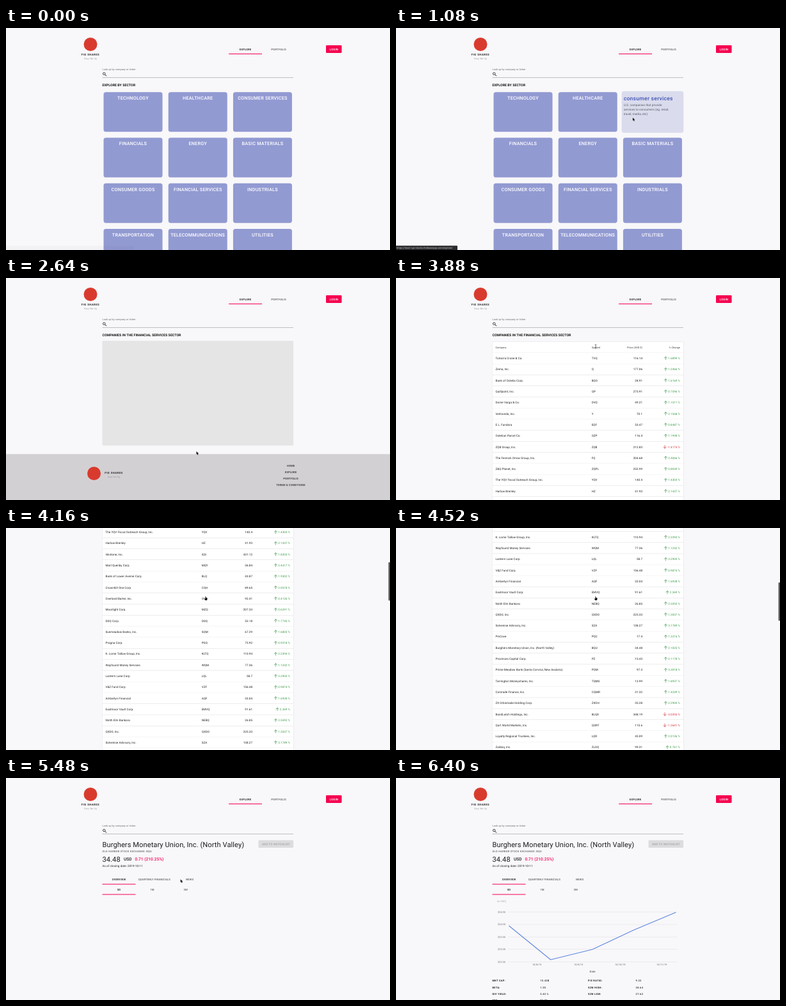
Recreate the animation shown at these times as an HTML page with a canvas. Size 600 by 347 pixels, loop 6440 ms.

```html
<!DOCTYPE html>
<html lang="en">
<head>
<meta charset="utf-8">
<title>Stock explorer</title>
<style>
html, body { margin: 0; width: 600px; height: 347px; overflow: hidden; background: #f8f7f9; }
canvas { display: block; width: 600px; height: 347px; }
</style>
</head>
<body>
<canvas id="stage"></canvas>
<script>
const W = 600, H = 347, LOOP = 6440;
const canvas = document.getElementById('stage');
const dpr = window.devicePixelRatio || 1;
canvas.width = W * dpr;
canvas.height = H * dpr;
const g = canvas.getContext('2d');

const PINK = '#f50050', INK = '#1c1c1e', GREY = '#6b6a6d', RED = '#d93a2e';
const LOAD = 2400, TABLE = 3480, DETAIL = 5360, CHART = 5640;
const ROW = 17.3, FIRST_ROW = 125.5;

const sectors = ['TECHNOLOGY', 'HEALTHCARE', 'CONSUMER SERVICES', 'FINANCIALS', 'ENERGY',
  'BASIC MATERIALS', 'CONSUMER GOODS', 'FINANCIAL SERVICES', 'INDUSTRIALS',
  'TRANSPORTATION', 'TELECOMMUNICATIONS', 'UTILITIES'];

// card index, time in, time out, description
const hovers = [
  [2, 840, 1130, 'U.S. companies that provide|services to consumers (eg. retail,|travel, media, etc)'],
  [1, 1140, 1390, 'U.S. companies involved with|health care (eg. medicines,|hospitals, devices, etc)'],
  [4, 1400, 1650, 'U.S. companies involved with the|production of energy (eg. oil, gas,|coal & renewables, etc)'],
  [5, 1660, 1950, 'U.S. companies involved with the|production of raw materials (eg. metals,|chemicals & forestry products, etc)'],
  [7, 2000, LOAD, 'U.S. companies that provide|financial services (eg. banks, credit|cards, exchanges, etc)']
];

const stocks = `Tolvarra Crane & Co.|TVQ|116.14|1.6899
Zemo, Inc.|Q|177.06|1.2466
Bank of Ostelia Corp.|BQO|28.91|1.6169
Quillpoint, Inc.|QP|275.91|0.7596
Dorne Varga & Co.|DVQ|49.21|1.1511
Velmondo, Inc.|Y|70.1|2.1568
E.L. Fundora|EQF|53.47|0.8487
Ostelian Parcel Co.|OZP|116.4|1.1998
ZQB Group, Inc.|ZQB|212.83|-1.4174
The Fennick Orrow Group, Inc.|FQ|204.68|2.4066
Z&Q Planet, Inc.|ZQPL|252.99|0.8049
The YQV Fiscal Outreach Group, Inc.|YQV|140.4|1.4304
Harlow Brenley|HZ|41.93|2.1437
Inkstone, Inc.|IQS|431.12|1.8203
Marl Quenby Corp.|MQY|36.84|2.4417
Bank of Lower Averne Corp.|BLQ|43.87|1.9302
Crownhill One Corp.|CQH|89.65|2.0518
Overland Barter, Inc.|OVQ|92.41|0.4126
Moorlight Corp.|MZQ|207.33|0.6291
DDQ Corp.|DDQ|52.18|1.7745
Sunmeadow Banks, Inc.|SQM|67.29|1.6803
Progna Corp.|PGQ|75.92|0.9318
K. Lorne Tallow Group, Inc.|KLTQ|110.94|2.2394
Wayfound Money Services|WQM|77.36|1.1242
Lantern Lane Corp.|LQL|58.7|3.2905
V&Z Fund Corp.|VZF|156.48|0.9874
Amberlyn Financial|AQF|33.04|1.6928
Eastmoor Vault Corp.|EMVQ|91.61|2.369
Ninth Elm Bankora|NEBQ|26.85|2.5592
QXDO, Inc.|QXDO|225.33|1.2037
Solvenise Advisory, Inc.|SZA|138.27|3.1789
PinCove|PQC|17.4|1.2216
Burghers Monetary Union, Inc. (North Valley)|BQU|34.48|2.1025
Provinces Capital Corp.|PZ|15.43|2.1178
Prime Meadow Bank (Santa Corvina, New Avaloria)|PQM|97.3|3.3018
Tarrington Moneyshares, Inc.|TQMS|13.99|1.8937
Comrade Finance, Inc.|CQMR|31.32|1.4249
ZX Orbistrade Holding Corp.|ZXOH|35.28|2.2905
BondLatch Holdings, Inc.|BLQX|348.19|-3.0355
Qort World Markets, Inc.|QORT|115.6|-1.2641
Loyalty Regional Trustees, Inc.|LQR|45.09|2.0136
Zaldoq, Inc.|ZLDQ|99.31|0.761
QBD Finance Group|QBDG|202.16|3.0509
Vantrow Financial Corp.|VQFC|39.43|2.2327`.split('\n').map(line => line.split('|'));

// time, x, y of the pointer
const path = [[560, 592, 250], [900, 425, 140], [1250, 320, 140], [1500, 300, 196],
  [1800, 393, 200.5], [2150, 297.5, 271], [2700, 297.5, 271], [3700, 312, 107],
  [4900, 312, 107], [5080, 278.5, 128.5], [5220, 272, 156], [5450, 272, 156], [5950, 330, 362]];

const clamp = v => Math.max(0, Math.min(1, v));
const mix = (a, b, k) => a + (b - a) * k;

function pointerAt(t) {
  if (t < path[0][0]) return null;
  const i = path.findIndex(p => p[0] > t);
  if (i < 0) return null;
  const [t0, x0, y0] = path[i - 1], [t1, x1, y1] = path[i];
  const u = (t - t0) / (t1 - t0), k = u * u * (3 - 2 * u);
  return [mix(x0, x1, k), mix(y0, y1, k)];
}

const scrollAt = t => 521.5 * (1 - (1 - clamp((t - 3900) / 1008)) ** 3);

// y is the middle of the capitals, spacing is in em
function text(s, x, y, size, color = INK, weight = 400, spacing = 0, align = 'left') {
  g.font = `${weight} ${size}px Roboto, sans-serif`;
  g.letterSpacing = spacing * size + 'px';
  g.textAlign = align;
  g.fillStyle = color;
  g.fillText(s, x, y + size * 0.355);
}

function box(x, y, w, h, color, r = 0) {
  g.fillStyle = color;
  g.beginPath();
  g.roundRect(x, y, w, h, r);
  g.fill();
}

function line(points, color, width) {
  g.strokeStyle = color;
  g.lineWidth = width;
  g.beginPath();
  points.forEach(([x, y]) => g.lineTo(x, y));
  g.stroke();
}

function dot(x, y, r, color) {
  g.fillStyle = color;
  g.beginPath();
  g.arc(x, y, r, 0, 7);
  g.fill();
}

const tab = (s, x, y, color = INK) => text(s, x, y, 4.24, color, 500, 0.0286, 'center');
const underline = (x, y) => box(x, y, 52, 0.9, PINK);
const heading = s => text(s, 150.5, 89.3, 5.22, '#111', 700, 0.0094);

function brand(x, y) {
  text('FIG SHARES', x, y, 4.3, '#2b2b2d', 700, 0.1, 'center');
  text('Easy like fig', x, y + 6.4, 3.3, '#8d8c90', 400, 0.05, 'center');
}

function header(shift) {
  dot(132, 25.5, 10.5, RED);
  brand(132, 41.2);
  tab('EXPLORE', 374, 33);
  tab('PORTFOLIO', 426, 33, '#5d5c60');
  underline(348, 40);
  box(500, 27, 24.5, 12, PINK, 1.3);
  text('LOGIN', 512.3, 33, 4.56, '#fff', 500, 0.0286, 'center');
  g.save();
  g.translate(0, shift);
  text('Look up by company or ticker', 150.5, 64.2, 3.91, GREY, 400, 0.009);
  g.strokeStyle = '#111';
  g.lineWidth = 0.8;
  g.beginPath();
  g.arc(153.3, 71.4, 1.8, 0, 7);
  g.stroke();
  line([[154.6, 72.7], [157, 75.1]], '#111', 1);
  box(150.5, 76.9, 298.5, 0.6, '#87868a');
  g.restore();
}

function card(i, t) {
  const cx = 198.5 + (i % 3) * 101.2, top = 100.3 + Math.floor(i / 3) * 71.2;
  const h = hovers.find(v => v[0] === i);
  let k = 0, on = false;
  if (h) {
    on = t >= h[1] && t < h[2];
    k = t < h[2] ? clamp((t - h[1]) / 140) : clamp(1 - (t - h[2]) / 220);
  }
  const s = 1 + 0.05 * k, w = 92 * s, ht = 62 * s;
  const color = `rgb(${mix(146, 218, k)},${mix(154, 220, k)},${mix(210, 237, k)})`;
  box(cx - w / 2, top + 31 - ht / 2, w, ht, color, 3.6);
  if (on) {
    text(sectors[i].toLowerCase(), cx - 45.2, top + 9.8, 8.6, '#3f51b5', 500, 0.029);
    h[3].split('|').forEach((s, n) =>
      text(s, cx - 45.2, top + 20.5 + n * 6.75, 4.7, '#55565f', 400, 0.0107));
  } else {
    text(sectors[i], cx, top + 9.4, 7.26, '#fff', 500, 0.031, 'center');
  }
}

function explorePage(t) {
  header(0);
  heading('EXPLORE BY SECTOR');
  sectors.forEach((_, i) => card(i, t));
  if (t < 960) {
    box(0, 340.5, 200, 6.5, 'rgba(0,0,0,.025)');
  } else {
    box(0, 340.3, 96, 6.7, '#2b2a2d', [0, 1, 0, 0]);
    text('https://react-xyz-stocks.firebaseapp.com/explore/', 1, 343.6, 3.95, '#c9c8cb');
  }
}

const sectorTitle = () => heading('COMPANIES IN THE FINANCIAL SERVICES SECTOR');

function loadingPage(t) {
  header(0);
  sectorTitle();
  const v = 229 + 4 * Math.sin((t - 2640) / 1500 * 2 * Math.PI);
  box(150.5, 98.3, 298.5, 163.5, `rgb(${v},${v},${v})`, 1);
  box(0, 275.3, W, 72, '#d3d0d3');
  dot(137.5, 305.5, 10.5, RED);
  brand(168.5, 304);
  ['HOME', 'EXPLORE', 'PORTFOLIO', 'TERMS & CONDITIONS'].forEach((s, i) =>
    tab(s, 445, 293.2 + i * 10.1, '#2f2e31'));
}

function arrow(x, y, dir, color) {
  line([[x, y + 2.5 * dir], [x, y - 2.3 * dir]], color, 0.75);
  line([[x - 2.5, y], [x, y - 2.4 * dir], [x + 2.5, y]], color, 0.75);
}

function stockRow([name, symbol, price, change], y, lit) {
  if (lit) box(150.5, y - ROW / 2, 298.5, ROW, '#e6e5e6');
  const cell = (s, x, color, align) => text(s, x, y, 4.56, color, 400, 0.0107, align);
  const down = change < 0, color = down ? '#d5303c' : '#3f9a4c', label = change + ' %';
  cell(name, 155.5, INK);
  cell(symbol, 305.7, INK);
  cell(price, 385, INK, 'right');
  cell(label, 444, color, 'right');
  arrow(444 - g.measureText(label).width - 3.8, y, down ? -1 : 1, color);
  box(150.5, y + ROW / 2 - 0.2, 298.5, 0.4, '#dddce0');
}

function tablePage(t) {
  const scroll = scrollAt(t);
  const p = pointerAt(t - 130);
  const lit = t > 4960 ? Math.round((p[1] + scroll - FIRST_ROW) / ROW) : -1;
  g.save();
  g.translate(0, -scroll);
  header(0);
  sectorTitle();
  box(150, 99.6, 299.5, 1800, '#e3e2e6', 1.3);
  box(150.5, 100, 298.5, 1800, '#fff', 1.3);
  const head = (s, x, align) => text(s, x, 108.6, 3.91, '#5f5e62', 500, 0.0107, align);
  head('Company', 155.5);
  head('Symbol', 305.7);
  head('Price (USD $)', 385, 'right');
  head('% Change', 444, 'right');
  box(150.5, 116.7, 298.5, 0.4, '#dddce0');
  stocks.forEach((s, i) => stockRow(s, FIRST_ROW + i * ROW, i === lit));
  g.restore();
  if (t > 3900) box(597.6, scroll * 0.173, 2.4, 60, '#5a595c', 1);
}

function chart() {
  const label = (s, x, y, align) => text(s, x, y, 3.91, '#6f6e72', 400, 0, align);
  text('(in USD)', 158, 193, 3.91, '#a9a8ac');
  for (let i = 0; i < 5; i++) {
    const y = 209.6 + i * 19.4;
    box(175, y - 0.25, 264, 0.5, '#dfdee2');
    label('$' + (34.5 - i / 2).toFixed(2), 171, y, 'right');
  }
  for (let i = 0; i < 4; i++) label(`10/${8 + i}/19`, 220 + i * 65.1, 292, 'center');
  g.lineJoin = 'round';
  line([[176.5, 231], [241.6, 284], [306.7, 268], [371.8, 237.4], [437.3, 210]], '#5f86e0', 1.1);
  g.lineJoin = 'miter';
  text('Date', 307, 302, 4.3, '#3a393c', 400, 0, 'center');
}

function detailPage(t) {
  header(10.5);
  const [name, symbol, price] = stocks[32];
  text(name, 150.5, 103.6, 11.09, INK, 400, 0.0074);
  text('OLD HARBOR STOCK EXCHANGE: ' + symbol, 150.5, 115, 3.91, '#2f2e31', 400, 0.0833);
  text(price, 150.5, 127.5, 11.09, INK, 400, 0.0074);
  text('USD', 184, 127, 6.52, INK, 500, 0.0075);
  text('0.71 (210.25%)', 201.5, 127, 6.52, PINK, 500, 0.0075);
  text('As of closing date: 2019-10-11', 150.5, 137.6, 4.56, INK, 400, 0.0107);
  box(394.5, 97.2, 54.5, 11.8, '#dcdbdd', 1.3);
  text('ADD TO WATCHLIST', 421.8, 103.1, 4.56, '#a3a2a5', 500, 0.0286, 'center');
  tab('OVERVIEW', 176.5, 158.6);
  tab('QUARTERLY FINANCIALS', 231.8, 158.6, '#5d5c60');
  tab('NEWS', 287, 158.6, '#5d5c60');
  underline(150.5, 165.5);
  tab('5D', 176.5, 174.6);
  tab('1M', 228.5, 174.6, '#5d5c60');
  tab('3M', 280.7, 174.6, '#5d5c60');
  underline(150.5, 181.5);
  if (t < CHART) return;
  chart();
  const stats = ['MKT CAP:', '15.42B', 'P/E RATIO:', '9.22', 'BETA:', '1.55', '52W HIGH:', '38.64',
    'DIV YIELD:', '3.42 %', '52W LOW:', '27.62', 'EPS:', '$3.79'];
  stats.forEach((s, i) => text(s, 150.5 + (i % 4) * 74.7, 317 + Math.floor(i / 4) * 10.3,
    3.91, INK, i % 2 ? 500 : 700, 0.0833));
}

const shape = (x, y, points) => {
  g.beginPath();
  points.forEach(([a, b]) => g.lineTo(x + a, y + b));
  g.closePath();
  g.strokeStyle = '#fff';
  g.lineWidth = 0.8;
  g.stroke();
  g.fillStyle = '#111';
  g.fill();
};

function pointer(t) {
  const p = pointerAt(t);
  if (!p) return;
  const [x, y] = p;
  if (t > 3600 && t < 3920) {
    line([[x, y - 2.6], [x, y + 2.6]], '#222', 0.6);
    for (const d of [-2.8, 2.8]) line([[x - 1.3, y + d], [x + 1.3, y + d]], '#222', 0.6);
  } else if (t >= 3920 && t < 4960) {
    shape(x, y, [[-0.6, 0], [0.3, 0], [0.5, 2], [2.6, 2.6], [2.4, 4.6], [1.8, 6], [-0.8, 6], [-2.2, 3.4], [-0.6, 3.6]]);
  } else {
    shape(x, y, [[0, 0], [0, 5], [1.2, 4], [2.1, 5.9], [3, 5.5], [2.2, 3.7], [3.7, 3.6]]);
  }
}

function draw(now) {
  const t = now % LOOP;
  g.setTransform(dpr, 0, 0, dpr, 0, 0);
  g.textRendering = 'geometricPrecision';
  box(0, 0, W, H, '#f8f7f9');
  const page = t < LOAD ? explorePage : t < TABLE ? loadingPage : t < DETAIL ? tablePage : detailPage;
  page(t);
  pointer(t);
}

function tick() {
  draw(performance.now());
  requestAnimationFrame(tick);
}
tick();
</script>
</body>
</html>
```
